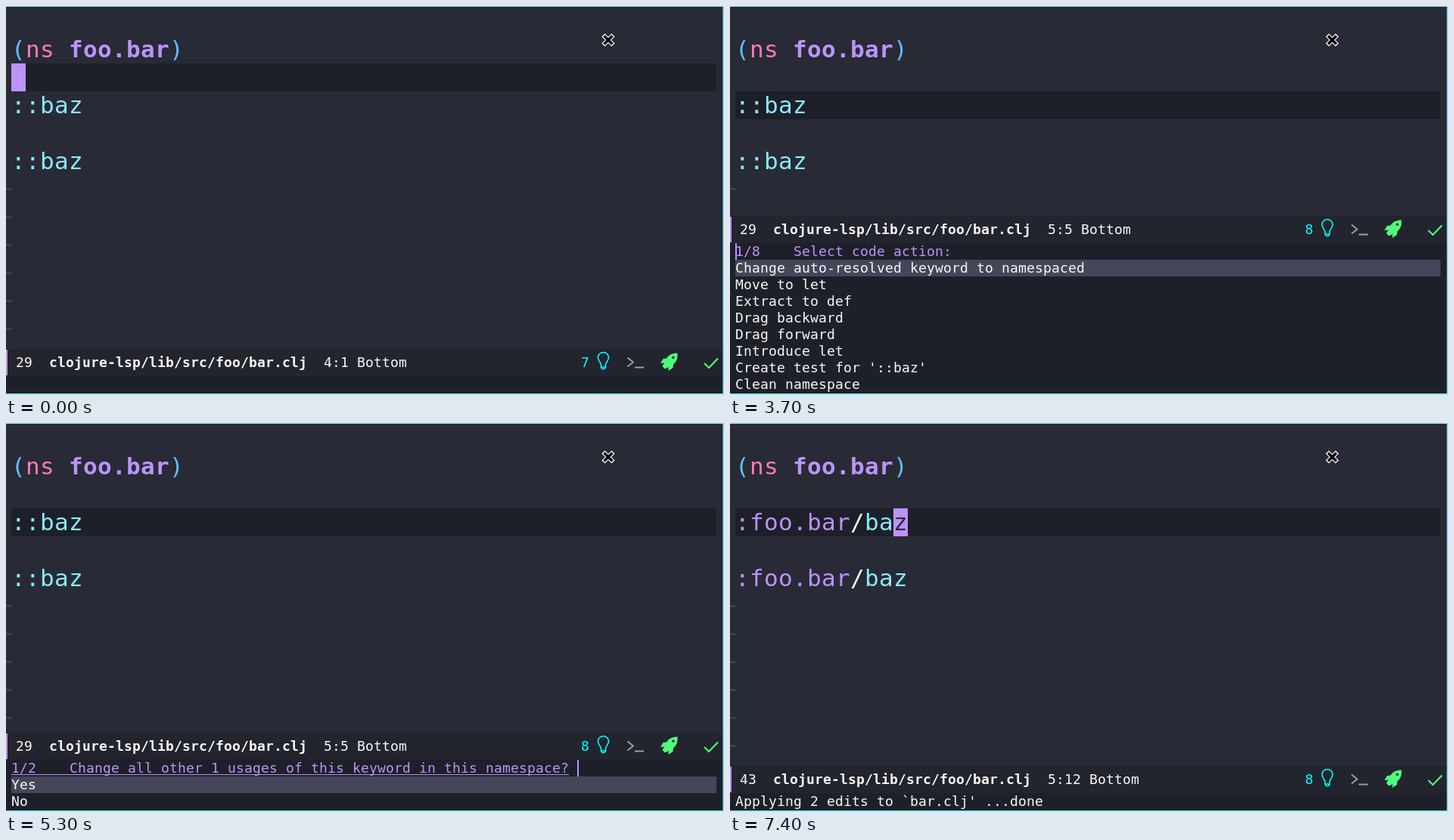
An HTML page for the animation above (8000 ms loop, 949 px wide and 515 px high).

```html
<!DOCTYPE html>
<html lang="en">
<head>
<meta charset="utf-8">
<title>Editor session</title>
<style>
html, body { margin: 0; width: 100%; height: 100%; overflow: hidden; background: #282a36; }
svg { display: block; }
text { font: 18px "DejaVu Sans Mono", monospace; letter-spacing: .163px; white-space: pre; }
.code { font-size: 31px; letter-spacing: .337px; }
.bold { font-weight: bold; }
</style>
</head>
<body>
<svg id="stage" width="949" height="515" viewBox="0 0 949 515"></svg>
<script>
const LOOP = 8000, LEFT = 7, WIDTH = 932;
const ROW = 37, CELL = 19, MINI_ROW = 22, MINI_CELL = 11, MINI_END = 512, BAR = 36;
const WHITE = '#f8f8f2', PURPLE = '#bd93f9', CYAN = '#8be9fd', PINK = '#ff79c6', BLUE = '#61bfff',
  GREEN = '#50fa7b', AQUA = '#00ffff', GRAY = '#a0a0a0', BG = '#282a36', BAR_BG = '#22242e',
  DARK = '#1e2029', PICKED = '#44475a';

const rect = (x, y, w, h, fill) => `<rect x="${x}" y="${y}" width="${w}" height="${h}" fill="${fill}"/>`;
const text = (x, y, s, fill = WHITE, cls = '') => `<text x="${x}" y="${y}" class="${cls}" fill="${fill}">${s}</text>`;
const stroke = (d, color, width) => `<path d="${d}" fill="none" stroke="${color}" stroke-width="${width}"/>`;
const rowTop = row => 39 + ROW * row;

// Writes [string, colour, class] runs on the code grid.
function code(row, col, ...runs) {
  return runs.map(([s, fill, cls = '']) => {
    const out = text(LEFT + CELL * col, rowTop(row) + 29, s, fill, 'code ' + cls);
    col += s.length;
    return out;
  }).join('');
}

const actions = {
  prompt: 'Select code action:',
  items: ['Change auto-resolved keyword to namespaced', 'Move to let', 'Extract to def', 'Drag backward',
    'Drag forward', 'Introduce let', "Create test for '::baz'", 'Clean namespace']
};
const confirmation = {
  prompt: 'Change all other 1 usages of this keyword in this namespace?',
  items: ['Yes', 'No'],
  underline: true
};

// Each step changes the state from its time on.
const steps = [
  [0, { row: 1, col: 0, pos: '4:1', size: 29, count: 7, echo: '', menu: null, pick: 0, home: false, ns: null }],
  [470, { row: 2, col: 4, pos: '5:5' }],
  [730, { count: 8 }],
  [1030, { echo: 'foo.bar/baz' }],
  [1200, { echo: 'SPC-' }],
  [1300, { echo: 'SPC c-' }],
  [1600, { echo: '', menu: actions }],
  [3700, { home: true }],
  [3730, { menu: null, home: false }],
  [3770, { menu: confirmation }],
  [4970, { pick: 1 }],
  [5300, { pick: 0 }],
  [5770, { pick: 1 }],
  [6030, { pick: 0 }],
  [6900, { home: true }],
  [6935, { menu: null }],
  [6970, { ns: CYAN, col: 11, pos: '5:12', size: 43, echo: "Applying 2 edits to `bar.clj' ...done" }],
  [7400, { ns: PURPLE }]
];

function stateAt(time) {
  return Object.assign({}, ...steps.filter(([start]) => start <= time).map(step => step[1]));
}

function editor(s, bottom) {
  const keyword = s.ns ? [[':foo.bar', s.ns], ['/', WHITE], ['baz', CYAN]] : [['::baz', CYAN]];
  let out = rect(LEFT, rowTop(s.row), WIDTH, ROW, DARK)
    + code(0, 0, ['(', BLUE], ['ns ', PINK], ['foo.bar', PURPLE, 'bold'], [')', BLUE])
    + code(2, 0, ...keyword) + code(4, 0, ...keyword);
  if (!s.menu) {
    out += rect(LEFT + CELL * s.col, rowTop(s.row), CELL, ROW, PURPLE);
    if (s.row === 2) out += code(2, s.col, ['z', BG]);
  }
  for (let y = rowTop(5) + 18; y + 10 < bottom; y += ROW)
    out += stroke(`M0 ${y + 1.5}q2 -3 4 -1t3.5 -1`, '#565761', 1.2);
  return out;
}

function icons() {
  return stroke('M786.5 24.5v-3.5c0 -3 -4 -5 -4 -9.500a7 7 0 0 1 14 0c0 4.500 -4 6.500 -4 9.500v3.500q-3 4.500 -6 0z', AQUA, 1.6)
    + stroke('M786.5 24h6', AQUA, 1.5)
    + stroke('M821.500 11.500l7.500 6l-7.500 6M831 24.500h12', GRAY, 1.8)
    + `<path fill="${GREEN}" fill-rule="evenodd" d="M887.500 5.500c-7 0 -11 2 -14.500 7l-4.500 .5l-3.500 6l5 -.5l-2.500 4.500l3.500 3.500l4.500 -2.500l0 5l6 -4l.5 -4.500c4.500 -4 6 -8 5.500 -15zM882 9.500a1.700 1.700 0 1 1 0 3.400a1.700 1.700 0 1 1 0 -3.400z"/>`
    + stroke('M923 19l6 6l12 -12.500', GREEN, 2.2);
}

function modeline(s, top) {
  return `<g transform="translate(0 ${top})">` + rect(0, 0, 949, BAR, BAR_BG) + rect(0, 1, 2, 34, PURPLE)
    + text(13, 24, s.size) + text(57, 24, 'clojure-lsp/lib/src/foo/bar.clj', WHITE, 'bold')
    + text(420, 24, s.pos + ' Bottom') + text(760, 24, s.count, AQUA) + icons() + '</g>';
}

function minibuffer(s, top) {
  const baseline = top + 17, { menu, pick } = s;
  let out = rect(0, top, 949, 515 - top, DARK);
  if (!menu) return out + text(LEFT, baseline, s.echo);
  const header = `${pick + 1}/${menu.items.length}    ${menu.prompt}`;
  const length = header.length * MINI_CELL;
  out += rect(LEFT, top + MINI_ROW * (pick + 1), WIDTH, MINI_ROW, PICKED) + text(LEFT, baseline, header, PURPLE);
  if (menu.underline) out += rect(LEFT, baseline + 2, length, 1, PURPLE);
  out += rect(LEFT + (s.home ? 0 : length + MINI_CELL), top, 2, MINI_ROW, PURPLE);
  return out + menu.items.map((item, i) => text(LEFT, baseline + MINI_ROW * (i + 1), item)).join('');
}

const pointer = stroke('M789.500 38.500l13 13m0 -13l-13 13', '#fff', 6) + stroke('M790.500 39.500l11 11m0 -11l-11 11', '#000', 3.6);
const border = rect(0, 0, 949, 1, CYAN) + rect(0, 513, 949, 2, CYAN) + rect(947.5, 0, 1.5, 515, CYAN);

function draw(s) {
  const rows = s.menu ? s.menu.items.length + 1 : 1;
  const top = MINI_END - MINI_ROW * rows;
  return rect(0, 0, 949, 515, BG) + editor(s, top - BAR) + modeline(s, top - BAR)
    + minibuffer(s, top) + pointer + border;
}

const stage = document.getElementById('stage');
const began = performance.now();
let shown = '';
function frame() {
  const picture = draw(stateAt((performance.now() - began) % LOOP));
  if (picture !== shown) stage.innerHTML = shown = picture;
  requestAnimationFrame(frame);
}
frame();
</script>
</body>
</html>
```
